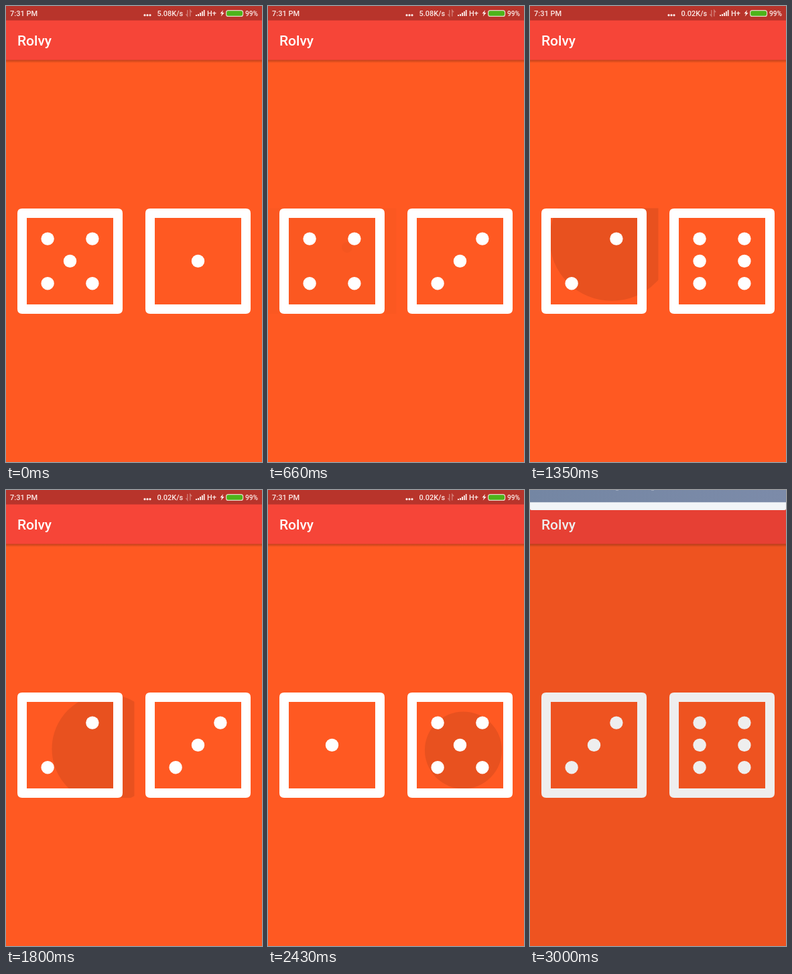
An HTML page for the animation above (3030 ms loop, 382 by 680 pixels).

```html
<!DOCTYPE html>
<html lang="en">
<head>
<meta charset="utf-8">
<title>Rolvy</title>
<style>
  html, body { margin: 0; width: 100%; height: 100%; overflow: hidden; background: #ff5922; }
  svg { display: block; width: 382px; height: 680px; }
  text { font: 500 11px Roboto, sans-serif; fill: #fbe9e6; }
  .title { font-size: 21px; fill: #fff; }
</style>
</head>
<body>
<svg viewBox="0 0 382 680">
  <defs>
    <linearGradient id="shadow" x2="0" y2="1">
      <stop stop-opacity=".27"/><stop offset="1" stop-opacity="0"/>
    </linearGradient>
    <linearGradient id="sky"><stop stop-color="#7486a3"/><stop offset="1" stop-color="#7c8ba9"/></linearGradient>
    <clipPath id="cell0"><rect x="1" y="301.5" width="190.5" height="157.5"/></clipPath>
    <clipPath id="cell1"><rect x="191.5" y="301.5" width="190.5" height="157.5"/></clipPath>
  </defs>

  <rect width="382" height="680" fill="#ff5922"/>
  <rect y="80" width="382" height="5" fill="url(#shadow)"/>
  <rect width="382" height="80.5" fill="#f64538"/>
  <text class="title" x="17" y="59">Rolvy</text>

  <rect width="382" height="21.5" fill="#b8342b"/>
  <text x="6" y="15">7:31 PM</text>
  <g fill="#fbe9e6">
    <circle cx="207" cy="13.7" r="1.6"/><circle cx="211" cy="13.7" r="1.6"/><circle cx="215" cy="13.7" r="1.6"/>
    <path d="M283 15v-2h2v2zM286 15v-3h2v3zM289 15v-5h2v5zM292 15v-7h1.8v7zM294.8 15v-9h1.8v9z"/>
    <path d="M324 6l-4.5 5.2h2.6l-1.3 4.3 5-5.6h-2.8z"/>
  </g>
  <text id="speed" x="225.5" y="15"></text>
  <path id="arrows" d="M270.8 6v9l-2.3-2.8M274.8 15.5v-9l2.3 2.8" fill="none" stroke="#fbe9e6" stroke-width="1.4"/>
  <text x="300" y="15">H+</text>
  <rect x="328.6" y="6.6" width="25" height="8.8" rx="3" fill="#4db41a" stroke="#e9d5c9" stroke-width="1.2"/>
  <text x="357" y="14.8" style="font-size:10.2px">99%</text>

  <g id="ripples"></g>
  <g id="dice" fill="#fff"></g>

  <rect id="dim" width="382" height="680" opacity="0"/>
  <g id="shade">
    <path d="M0 -20H382V28q0 2-2 2H2q-2 0-2-2z" fill="#f2f5f8"/>
    <rect y="-20" width="382" height="38.3" fill="url(#sky)"/>
    <path d="M128 0h4M181 0h4" stroke="#c3ccd9"/>
  </g>
</svg>
<script>
const LOOP = 3030, STEP = 30, HOLD = 50, FADE_IN = 45;
const $ = id => document.getElementById(id);
const clamp = v => Math.max(0, Math.min(1, v));

// Each tap: start, x, y, then the faces rolled on release.
const taps = [
  [20, 118, 370, 4, 6], [165, 120, 364, 3, 2], [345, 121, 362, 4, 3],
  [648, 118, 360, 5, 2], [800, 120, 356, 1, 4], [930, 121, 352, 6, 3],
  [1100, 121, 350, 3, 5], [1247, 122, 347, 2, 6], [1465, 138, 370, 5, 4],
  [1704, 150, 386, 2, 3], [2060, 285, 384, 6, 1], [2205, 288, 386, 4, 2],
  [2349, 291.5, 388, 1, 5], [2435, 291, 387, 2, 4], [2635, 290, 388, 3, 6]
];

function add(parent, tag, attrs) {
  const el = document.createElementNS("http://www.w3.org/2000/svg", tag);
  for (const key in attrs) el.setAttribute(key, attrs[key]);
  return parent.appendChild(el);
}

// Column, row and the faces that show each pip.
const spots = [
  [-1, -1, "456"], [1, -1, "23456"], [-1, 0, "6"], [0, 0, "135"],
  [1, 0, "6"], [-1, 1, "23456"], [1, 1, "456"]
];

const dice = [0, 191].map(x => {
  const die = add($("dice"), "g", { transform: `translate(${x})` });
  add(die, "path", {
    "fill-rule": "evenodd",
    d: "M24 302H167q7 0 7 7V452q0 7-7 7H24q-7 0-7-7V309q0-7 7-7zM31 316V445H160V316z"
  });
  return spots.map(([col, row, faces]) => ({
    faces,
    el: add(die, "circle", { cx: 95.5 + 33.4 * col, cy: 380.4 + 33.3 * row, r: 9.7 })
  }));
});

const ripples = taps.map(([start, x, y]) => {
  const right = x > 191;
  const group = add($("ripples"), "g", { "clip-path": `url(#cell${+right})` });
  return {
    start,
    glow: add(group, "rect", { x: right ? 191 : 0, y: 301, width: 192, height: 159 }),
    splash: add(group, "circle", { cx: x, cy: y })
  };
});

function drawRipple({ start, glow, splash }, t) {
  const age = t - start, released = Math.max(0, age - HOLD);
  const shown = clamp(age / FADE_IN);
  glow.setAttribute("opacity", 0.055 * shown * clamp(1 - released / 30));
  splash.setAttribute("opacity", 0.09 * shown * clamp((95 - released) / 40));
  splash.setAttribute("r", 8 + 1.6 * released);
}

function draw(now) {
  let t = Math.floor(now % LOOP / STEP) * STEP;
  if (t >= 1710 && t < 1920) t = t < 1800 ? 1710 : 1800;

  let faces = [5, 1];
  for (const [start, , , a, b] of taps) if (t >= start + HOLD) faces = [a, b];
  dice.forEach((pips, i) => pips.forEach(p =>
    p.el.setAttribute("visibility", p.faces.includes(faces[i]) ? "visible" : "hidden")));
  ripples.forEach(r => drawRipple(r, t));

  $("speed").textContent = t < 1110 ? "5.08K/s" : "0.02K/s";
  $("arrows").setAttribute("opacity", t >= 30 && t < 570 ? 1 : 0.4);

  const pull = clamp((t - 2910) / 90);
  $("dim").setAttribute("opacity", 0.065 * pull);
  $("shade").setAttribute("transform", `translate(0 ${30 * pull - 30})`);
  $("shade").setAttribute("visibility", pull ? "visible" : "hidden");
}

const origin = performance.now();
function tick() {
  draw(performance.now() - origin);
  requestAnimationFrame(tick);
}
tick();
</script>
</body>
</html>
```
